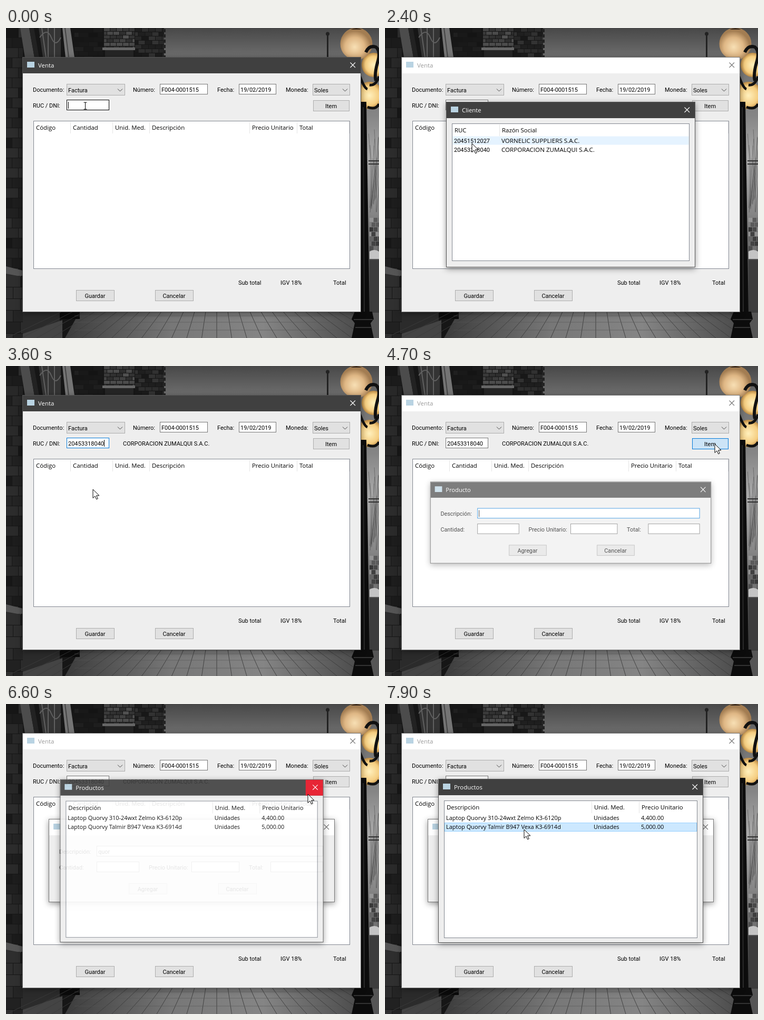
Animation, 708 px wide and 588 px high, one loop 8 s. Source, as an HTML page:

```html
<!DOCTYPE html>
<html lang="es">
<head>
<meta charset="utf-8">
<title>Venta</title>
<style>
html, body { margin: 0; width: 100%; height: 100%; overflow: hidden; background: #222; }
svg { display: block; width: 708px; height: 588px; }
text { white-space: pre; }
.ui { font: 11px Roboto, sans-serif; }
.head { font: 11.4px "Open Sans", sans-serif; }
.row { font: 11px "Open Sans", sans-serif; }
.frame { fill: #eee; stroke: #777; filter: drop-shadow(0 3px 6px #0006); }
.bar { fill: #fff; }
.title { fill: #999; }
.close { fill: none; stroke: #777; stroke-width: 1.1; }
.on .bar { fill: #404040; }
.on .title { fill: #fff; }
.on .close { stroke: #fff; }
.on .frame { stroke: #555; }
</style>
</head>
<body>
<svg id="stage" viewBox="0 0 708 588"></svg>
<script>
const LOOP = 8000, OPEN = 250;
const BLUE = '#0078d7', GREY = '#777';
const RUCS = ['20451512027', '20453318040'];
const FIRMS = ['VORNELIC SUPPLIERS S.A.C.', 'CORPORACION ZUMALQUI S.A.C.'];
const ITEMS = ['Laptop Quorvy 310-24wxt Zelmo K3-6120p', 'Laptop Quorvy Talmir B947 Vexa K3-6914d'];
const SEARCH = 'quor';

let seed = 7;
const rnd = () => (seed = seed * 16807 % 2147483647) / 2147483647;
const grey = v => `rgb(${v},${v},${v})`;

// Markup helpers
const block = (x, y, w, h, fill) => `<rect x="${x}" y="${y}" width="${w}" height="${h}" fill="${fill}"/>`;
const box = (x, y, w, h, fill, stroke, id = '') =>
  `<rect id="${id}" x="${x + .5}" y="${y + .5}" width="${w - 1}" height="${h - 1}" fill="${fill}" stroke="${stroke}"/>`;
const text = (x, y, s, cls = 'ui', extra = '') => `<text x="${x}" y="${y}" class="${cls}" ${extra}>${s}</text>`;
const line = (d, stroke, width = 1) => `<path d="${d}" fill="none" stroke="${stroke}" stroke-width="${width}"/>`;
const shape = (d, fill) => `<path d="${d}" fill="${fill}"/>`;
const field = (x, y, w, s = '', id = '') =>
  box(x, y, w, 20, '#fff', GREY, id) + text(x + 3, y + 15, s, 'ui', id && `id="${id}Text"`);
const caret = id => `<path id="${id}" stroke="#000"/>`;
const button = (x, y, w, s, id) => box(x, y, w, 21, '#e1e1e1', '#adadad', id) +
  text(x + w / 2 - .5, y + 15, s, 'ui', 'text-anchor="middle"');
const combo = (x, y, w, s) => box(x, y, w, 22, '#e1e1e1', '#adadad') + text(x + 3, y + 16, s) +
  line(`M${x + w - 14} ${y + 9.5}l4.5 4.5 4.5-4.5`, '#444');
const table = (x, y, w, h, heads, seps) => box(x, y, w, h, '#fff', '#828790') +
  heads.map(([hx, s]) => text(hx, y + 17, s, 'head')).join('') +
  seps.map(sx => line(`M${sx + .5} ${y + 2}v22`, '#e5e5e5')).join('');

function win(id, x, y, w, h, title, body) {
  return `<g id="${id}">
    <rect class="frame" x="${x + .5}" y="${y + .5}" width="${w - 1}" height="${h - 1}"/>
    <rect class="bar" x="${x + 1}" y="${y + 1}" width="${w - 2}" height="30"/>
    <rect id="${id}Hot" x="${x + w - 34}" y="${y + 1}" width="33" height="30" fill="#e81123" opacity="0"/>
    ${block(x + 9, y + 9, 14, 11, '#b9d3e2')}
    ${text(x + 30, y + 20, title, 'head title')}
    <path class="close" d="M${x + w - 20.5} ${y + 10.5}l9.5 9.5m0-9.5l-9.5 9.5"/>${body}</g>`;
}

// Backdrop
function bricks(x, y, w, h, bw, bh, lo, hi) {
  let out = '';
  for (let j = 0; j * bh < h; j++)
    for (let cx = x - (j % 2) * bw / 2; cx < x + w; cx += bw) {
      const left = Math.max(x, cx), right = Math.min(x + w, cx + bw - 1);
      if (right > left) out += block(left, y + j * bh, right - left, bh - 1, grey(Math.round(lo + rnd() * (hi - lo))));
    }
  return out;
}

function backdrop() {
  const stops = list => list.map(([o, c]) => `<stop offset="${o}" stop-color="${c}"/>`).join('');
  let s = `<defs>
    <linearGradient id="sky" x2="0" y2="1">${stops([[0, '#484848'], [.1, '#707070'], [.28, '#858585'], [.42, '#aaa'], [.6, '#858585'], [.74, '#555'], [1, '#444']])}</linearGradient>
    <linearGradient id="path">${stops([[0, '#3c3c3c'], [.35, '#777'], [.65, '#858585'], [1, '#454545']])}</linearGradient>
    <radialGradient id="globe" cx=".45" cy=".6">${stops([[0, '#f7dfb4'], [.6, '#dfb785'], [1, '#a37d52']])}</radialGradient>
    <radialGradient id="glow">${stops([[0, '#fff0bd'], [.7, '#f5cd80'], [1, '#b98843']])}</radialGradient></defs>`;
  s += block(0, 0, 708, 588, 'url(#sky)') + block(0, 0, 300, 588, '#161616');
  s += bricks(0, 0, 32, 460, 24, 19, 22, 46);
  // Gothic window and wall
  s += shape('M27 0h17l10 56H36z', '#4c4c4c') + shape('M44 0h9l10 56h-9z', '#222');
  s += shape('M62 0h42v56H70z', '#343434') + line('M68 0l8 56M80 0v56M92 0v56M64 18q14-20 22 0t18 0', '#606060', 2);
  s += shape('M107 0h15l8 56h-17z', '#747474') + line('M112 0l7 56', '#444', 2);
  s += bricks(130, 0, 54, 56, 18, 9, 18, 32) + bricks(186, 0, 58, 36, 12, 7, 42, 80);
  s += block(183, 37, 62, 5, '#666') + block(188, 42, 54, 14, '#252525');
  s += bricks(245, 0, 55, 56, 13, 8, 24, 52);
  for (let y = 2; y < 55; y += 10) s += block(298, y, 5, 6, '#222');
  s += block(609, 12, 3, 44, '#222') + `<circle cx="610.5" cy="11" r="3.5" fill="#222"/>`;
  // Wall base and paving
  s += shape('M0 452l32 8v12l-32-6z', '#555') + bricks(0, 470, 32, 118, 28, 22, 28, 48);
  s += block(32, 538, 70, 50, '#2b2b2b') + shape('M32 580l75-26v34H32z', '#444');
  s += shape('M140 538H660l30 50H112z', 'url(#path)') + block(102, 538, 38, 14, '#0b0b0b');
  for (let i = -14; i < 14; i++) s += line(`M${400 + i * 21} 538l${i * 7.5} 50`, '#3b3b3b', .9);
  for (const y of [546, 558, 573]) s += line(`M130 ${y}H672`, '#5559');
  // Railing, trees and distant details
  s += line('M688 252h20M688 258h20', '#333', 2);
  for (let i = 0; i < 14; i++) s += line(`M${690 + rnd() * 14} ${350 - rnd() * 30}q${rnd() * 10} -60 ${rnd() * 20 - 6} ${-90 - rnd() * 70}`, '#3336');
  s += bricks(690, 360, 18, 62, 8, 9, 50, 150) + shape('M690 424q9-6 18 0v14h-18z', '#c4c4c4') + block(690, 440, 18, 100, '#3d3d3d');
  s += shape('M690 540h18v48h-18z', '#555');
  // Lamp post
  s += `<circle cx="698" cy="70" r="23" fill="url(#glow)"/><circle cx="690" cy="128" r="26" fill="url(#glow)"/><circle cx="665" cy="30" r="30.5" fill="url(#globe)"/>`;
  s += shape('M654 3q11-6 22 0z', '#3a2c20') + line('M683 46q6-14 19-10q10 8 3 30q-6 22-3 34', '#111', 6);
  s += line('M672 92q8 22 14 24M708 92q-6 18 -18 16M686 150q16 6 22-6', '#111', 5);
  s += shape('M671 140h13l6 405h-22z', '#0d0d0d') + line('M678 150l2 390', '#2e2e2e', 2);
  s += shape('M662 538h33l3 14-6 8 6 28h-42l6-28-6-8z', '#0c0c0c') + line('M660 553h36M663 568h30', '#333', 2);
  return s;
}

const venta = win('venta', 31, 55, 643, 484, 'Venta',
  text(51, 121, 'Documento:') + combo(115, 106, 111, 'Factura') +
  text(241, 121, 'Número:') + field(292, 106, 91, 'F004-0001515') +
  text(401, 121, 'Fecha:') + field(442, 106, 71, '19/02/2019') +
  text(531, 121, 'Moneda:') + combo(582, 106, 71, 'Soles') +
  text(51, 151, 'RUC / DNI:') + field(115, 136, 81, '', 'ruc') + caret('rucCaret') +
  text(222, 151, '', 'ui', 'id="firm"') + button(583, 137, 69, 'Item', 'item') +
  table(52, 176, 601, 281, [[57, 'Código'], [127, 'Cantidad'], [207, 'Unid. Med.'], [277, 'Descripción'],
    [467, 'Precio Unitario'], [557, 'Total']], [122, 202, 272, 462, 552, 651]) +
  text(441, 487, 'Sub total') + text(521, 487, 'IGV 18%') + text(621, 487, 'Total') +
  button(133, 497, 73, 'Guardar') + button(283, 497, 73, 'Cancelar'));

const producto = win('producto', 81, 218, 543, 158, 'Producto',
  text(101, 284, 'Descripción:') + field(172, 269, 430, '', 'desc') + caret('descCaret') +
  text(101, 314, 'Cantidad:') + field(172, 299, 81) + text(271, 314, 'Precio Unitario:') + field(352, 299, 91) +
  text(461, 314, 'Total:') + field(502, 299, 100) +
  button(233, 340, 73, 'Agregar') + button(403, 340, 73, 'Cancelar'));

const cliente = win('cliente', 116, 140, 473, 314, 'Cliente',
  table(127, 181, 451, 261, [[132, 'RUC'], [222, 'Razón Social']], [217]) +
  box(128, 205, 449, 17, 'none', 'none', 'clienteRow') +
  FIRMS.map((s, i) => text(131, 218 + 17 * i, RUCS[i]) +
    text(221, 218 + 17 * i, s, 'row', 'style="font-size:11.6px"')).join(''));

const productos = win('productos', 101, 142, 503, 311, 'Productos',
  table(112, 183, 481, 261, [[117, 'Descripción'], [397, 'Unid. Med.'], [487, 'Precio Unitario']], [392, 482]) +
  box(113, 208, 479, 17, 'none', 'none', 'productosRow') +
  ITEMS.map((s, i) => text(116, 220 + 17 * i, s, 'row') + text(396, 220 + 17 * i, 'Unidades', 'row') +
    text(486, 220 + 17 * i, ['4,400.00', '5,000.00'][i], 'row')).join(''));

document.getElementById('stage').innerHTML = backdrop() + venta + producto + cliente + productos +
  '<path id="mouse" stroke="#000" stroke-linejoin="round"/>';
const $ = id => document.getElementById(id);
const set = (id, attrs) => { for (const k in attrs) $(id).setAttribute(k, attrs[k]); };

// Pointer route: time, x, y
const ROUTE = [[0, 150, 147], [1100, 150, 147], [1300, 148, 147], [1900, 148, 147], [2300, 165, 219],
  [2500, 165, 219], [2700, 165, 234], [3700, 165, 234], [4400, 626, 148], [5000, 626, 148],
  [5500, 573, 171], [7000, 573, 171], [7700, 264, 238], [LOOP, 264, 238]];
const POINTERS = {
  arrow: 'M0 0v16.5l4-3.7 2.7 6 2.6-1.2-2.7-5.8h5.4z',
  beam: 'M-3-6.5H3M0-6.5V6.5M-3 6.5H3',
  size: 'M0-10.5l5 5h-3.5v11h3.5l-5 5-5-5h3.5v-11h-3.5z'
};

const clamp = v => Math.max(0, Math.min(1, v));
const typed = (s, start, step, t) => s.slice(0, Math.max(0, Math.floor((t - start) / step) + 1));
const inside = ([x, y], l, t, w, h) => x >= l && x < l + w && y >= t && y < t + h;

function pointer(t) {
  const i = ROUTE.findIndex((p, k) => k && t <= p[0]);
  const [a, b] = [ROUTE[i - 1], ROUTE[i]];
  const p = (t - a[0]) / (b[0] - a[0]), e = p * p * (3 - 2 * p);
  return [a[1] + (b[1] - a[1]) * e, a[2] + (b[2] - a[2]) * e];
}

function fade(id, cx, cy, a) {
  const k = 1 - .055 * (1 - a);
  set(id, { opacity: a, display: a > 0 ? 'inline' : 'none',
    transform: `translate(${cx} ${cy}) scale(${k}) translate(${-cx} ${-cy})` });
}

function input(id, x, y, s, stroke, showCaret) {
  const label = $(id + 'Text');
  label.textContent = s;
  set(id, { stroke });
  set(id + 'Caret', { d: `M${Math.round(x + label.getComputedTextLength()) + .5} ${y}v13`, opacity: showCaret ? 1 : 0 });
}

function rowState(id, pos, x, y, w, picked) {
  const i = Math.floor((pos[1] - y) / 17), hit = inside(pos, x, y, w, 34);
  set(id, { y: y + .5 + 17 * (hit ? i : 0), fill: !hit ? 'none' : picked ? '#cce8ff' : '#e5f3ff',
    stroke: hit && picked ? '#99d1ff' : 'none' });
}

function draw(t) {
  const pos = pointer(t), blink = from => (t - from) % 1060 < 530;
  const chosen = t >= 3000;

  $('venta').classList.toggle('on', t < 1200 || chosen && t < 4550);
  $('producto').classList.toggle('on', t < 6400);
  $('cliente').classList.add('on');
  $('productos').classList.add('on');
  fade('cliente', 352.5, 297, clamp((t - 1185) / OPEN) * clamp((3100 - t) / 200));
  fade('producto', 352.5, 297, clamp((t - 4530) / OPEN));
  fade('productos', 352.5, 297.5, clamp((t - 6375) / OPEN));

  const rucEdge = t < 1400 ? '#000' : chosen && t < 4600 ? BLUE : GREY;
  input('ruc', 118, 140, chosen ? RUCS[1] : typed(RUCS[0].slice(0, 4), 400, 170, t), rucEdge,
    t < 400 ? blink(0) : t < 1400 || chosen && t < 4500 && blink(3200));
  $('firm').textContent = chosen ? FIRMS[1] : '';
  input('desc', 175, 273, typed(SEARCH, 5600, 170, t), t < 6400 ? BLUE : GREY, t < 6400 && (t > 5600 || blink(4500)));

  const hot = t < 5500 && inside(pos, 583, 137, 69, 21);
  set('item', { fill: !hot ? '#e1e1e1' : t < 4500 ? '#e5f1fb' : '#cce4f7', stroke: hot ? BLUE : '#adadad' });
  set('productosHot', { opacity: inside(pos, 570, 143, 33, 30) ? 1 : 0 });
  rowState('clienteRow', pos, 128, 205, 449, t >= 2800);
  rowState('productosRow', pos, 113, 208, 479, t >= 7800);

  const kind = t < 1300 ? 'beam' : t < 2000 ? 'size' : 'arrow';
  const half = kind === 'beam' ? .5 : 0;
  set('mouse', { d: POINTERS[kind], fill: kind === 'beam' ? 'none' : '#fff',
    transform: `translate(${Math.round(pos[0]) + half} ${Math.round(pos[1]) + half})` });
}

const start = performance.now();
function tick(now) {
  draw(Math.floor(Math.max(0, now - start) % LOOP / 100) * 100);
  requestAnimationFrame(tick);
}
draw(0);
requestAnimationFrame(tick);
</script>
</body>
</html>
```
